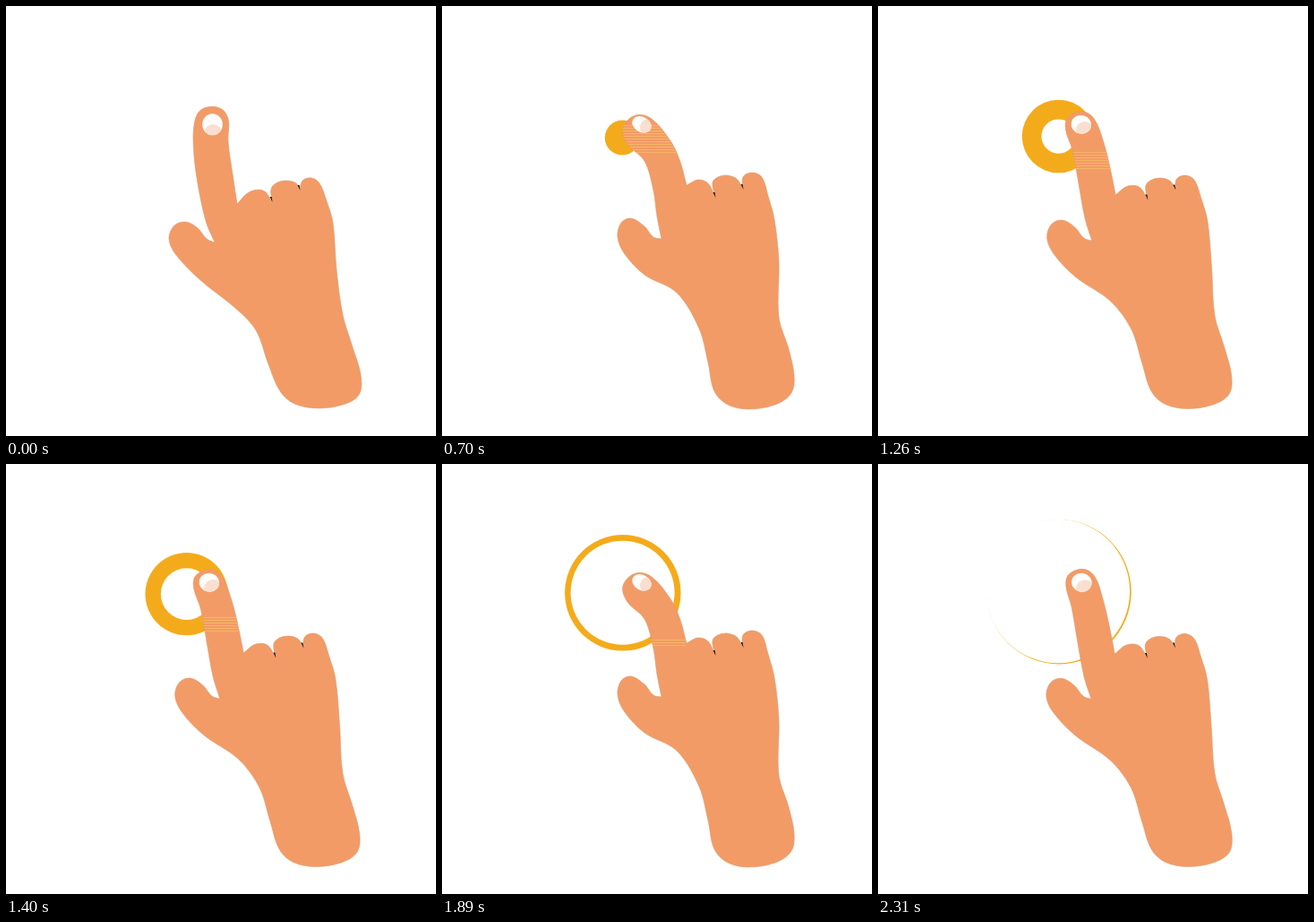
These frames come from a looping animation (480x480 px, 2380 ms). An HTML page with a canvas:

```html
<!DOCTYPE html>
<html lang="en">
<head>
<meta charset="utf-8">
<title>Tapping hand</title>
<style>
  html, body { margin: 0; width: 100%; height: 100%; overflow: hidden; background: #fff; }
  canvas { display: block; }
</style>
</head>
<body>
<canvas id="stage" width="480" height="480"></canvas>
<script>
const ctx = document.getElementById('stage').getContext('2d');
const LOOP = 2380, STEP = 70, HOLD = 210;
const SKIN = '#f39b66', EDGE = '#d99a70', GOLD = '#f4ab1b';

// Each part is an outline (x, y pairs) with the finger straight, then bent.
const finger = [
  [233,264, 223,240, 213,192, 209,150, 212,124, 221,114, 239,114, 248,126, 248,152, 253,188, 258,221],
  [245,260, 240,235, 236,206, 226,173, 207,154, 202,136, 216,122, 234,126, 256,152, 266,174, 273,200]
];
const knuckle1 = [
  [258,221, 271,208, 287,206, 297,218],
  [273,200, 286,194, 297,198, 305,213]
];
const knuckle2 = [
  [297,218, 296,204, 303,197, 314,195, 324,198, 328,205],
  [305,213, 302,197, 308,191, 318,189, 329,193, 336,204]
];
const knuckle3 = [
  [328,205, 331,195, 341,192, 350,198, 358,218, 365,242],
  [336,204, 336,191, 346,186, 357,191, 364,212, 371,238]
];
const wrist = [
  [369,295, 376,345, 386,378, 396,412, 394,434, 376,445, 348,449, 322,444, 306,430, 293,400, 279,362],
  [376,285, 376,347, 387,383, 393,412, 390,432, 372,445, 342,450, 319,445, 304,430, 297,398, 287,360]
];
const thumb = [
  [257,338, 217,306, 190,278, 182,260, 188,245, 201,241, 214,248, 224,260, 233,264],
  [262,320, 226,300, 204,277, 196,258, 200,242, 211,237, 226,246, 236,258, 245,260]
];

// Time and amount of bending: two taps per loop.
const bends = [[140, 0], [420, 0.75], [700, 1], [1050, 0.48], [1400, 0.48], [1890, 1], [2310, 0.42]];

const mix = (a, b, k) => a + (b - a) * k;

function bendAt(t) {
  if (t <= bends[0][0]) return 0;
  const i = bends.findIndex(([time]) => time >= t);
  const [t0, b0] = bends[i - 1], [t1, b1] = bends[i];
  return mix(b0, b1, (t - t0) / (t1 - t0));
}

// Smooth curve through x, y pairs, continuing the path from its first point.
function curve(path, p) {
  const last = p.length / 2 - 1;
  const point = i => {
    const n = 2 * Math.min(Math.max(i, 0), last);
    return { x: p[n], y: p[n + 1] };
  };
  path.lineTo(p[0], p[1]);
  for (let i = 0; i < last; i++) {
    const [a, b, c, d] = [i - 1, i, i + 1, i + 2].map(point);
    const reach = Math.hypot(c.x - b.x, c.y - b.y) / 3;
    const start = reach / Math.hypot(c.x - a.x, c.y - a.y);
    const end = reach / Math.hypot(d.x - b.x, d.y - b.y);
    path.bezierCurveTo(
      b.x + (c.x - a.x) * start, b.y + (c.y - a.y) * start,
      c.x - (d.x - b.x) * end, c.y - (d.y - b.y) * end, c.x, c.y);
  }
}

function disc(x, y, r, color) {
  ctx.fillStyle = color;
  ctx.beginPath();
  ctx.arc(x, y, r, 0, 2 * Math.PI);
  ctx.fill();
}

// The disc grows steadily; later a hole opens in it and catches up.
function ringAt(t) {
  const open = Math.max(0, (t - 1050) / 1260);
  const life = (t - 700) / 1610;
  return {
    x: mix(201.3, 202, life), y: mix(147, 142.7, life),
    outer: t < 630 ? 0 : mix(19.5, 80.7, life),
    inner: 80.2 * open ** 0.8,
    drift: open ** 4
  };
}

function drawRing({ x, y, outer, inner, drift }) {
  disc(x, y, outer, GOLD);
  disc(x - 1.1 * drift, y - 0.7 * drift, inner, '#fff');
}

function drawHand(bend, ring) {
  const pose = ([straight, bent]) => straight.map((v, i) => mix(v, bent[i], bend));
  const second = pose(knuckle2), third = pose(knuckle3);
  const hand = new Path2D();
  curve(hand, pose(finger));
  curve(hand, pose(knuckle1));
  curve(hand, second);
  curve(hand, [...third, ...pose(wrist), ...pose(thumb)]);
  hand.closePath();

  ctx.fillStyle = SKIN;
  ctx.fill(hand);
  ctx.strokeStyle = EDGE;
  ctx.lineWidth = 0.6;
  ctx.stroke(hand);

  drawStripes(hand, ring);
  drawNotch(second[0], second[1]);
  drawNotch(third[0], third[1]);
  drawNail(bend);
}

// Gold hairlines where the ring passes behind the finger.
function drawStripes(hand, { y, outer, inner }) {
  if (outer - inner < 2) return;
  const top = inner ? 0.9 * inner : -0.7 * outer;
  ctx.save();
  ctx.clip(hand);
  ctx.fillStyle = '#f6b566';
  for (let row = Math.round(y + top); row <= y + 0.9 * outer; row += 3) {
    ctx.fillRect(195, row, 77, 1);
  }
  ctx.restore();
}

function drawNotch(x, y) {
  ctx.fillStyle = '#1a0d08';
  ctx.beginPath();
  ctx.moveTo(x - 2.5, y - 5);
  ctx.lineTo(x + 0.5, y + 1);
  ctx.lineTo(x - 0.5, y - 5);
  ctx.fill();
}

function drawNail(bend) {
  ctx.save();
  ctx.beginPath();
  ctx.ellipse(mix(230.5, 223, bend), 132.3, 11.3, mix(12, 8.5, bend), bend * Math.PI / 6, 0, 2 * Math.PI);
  ctx.fillStyle = '#fffdfc';
  ctx.fill();
  ctx.clip();
  disc(231, mix(142, 135.5, bend), 10, '#f9dfd0');
  ctx.restore();
}

function draw(now) {
  const time = now % LOOP;
  const t = time < HOLD ? 0 : Math.floor(time / STEP) * STEP;
  const ring = ringAt(t);
  ctx.fillStyle = '#fff';
  ctx.fillRect(0, 0, 480, 480);
  drawRing(ring);
  drawHand(bendAt(t), ring);
  requestAnimationFrame(draw);
}
requestAnimationFrame(draw);
</script>
</body>
</html>
```
